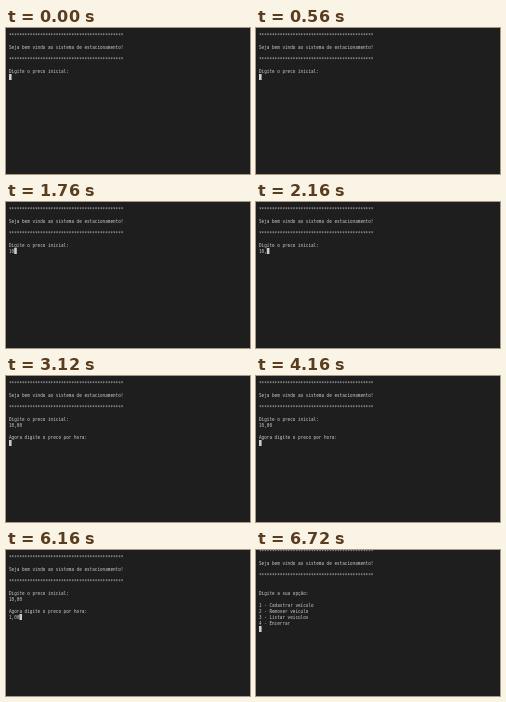
Write an HTML page that moves like this. It is 244 by 146 pixels and loops after 8000 ms.

```html
<!DOCTYPE html>
<html lang="pt">
<meta charset="utf-8">
<title>Estacionamento</title>
<style>
  html, body { margin: 0; width: 100%; height: 100%; overflow: hidden; background: #1e1e1e; }
  /* Laid out at ten times the size so that the tiny text keeps its exact advance. */
  pre {
    position: absolute; left: 3px; top: -2px; margin: 0;
    font: 43.2px/60px "DejaVu Sans Mono", monospace; color: #ccc;
    transform: scale(.1); transform-origin: 0 0;
  }
  i { display: inline-block; width: 26px; height: 60px; vertical-align: top; background: #ccc; }
</style>
<pre id="screen"></pre>
<script>
const LOOP = 8000;
const stars = '*'.repeat(44);
const hello = [stars, '', 'Seja bem vindo ao sistema de estacionamento!', '', stars, ''];
const menu = ['Digite a sua opção:', '', '1 - Cadastrar veículo', '2 - Remover veículo',
  '3 - Listar veículos', '4 - Encerrar', ''];
const startKeys = [1200, 1520, 2160, 2480, 2640];
const hourKeys = [5360, 5600, 5840, 6080];

const typed = (text, keys, t) => text.slice(0, keys.filter(k => t >= k).length);

function lines(t) {
  if (t >= 6720) return [...hello, '', ...menu];
  const out = ['', ...hello, 'Digite o preco inicial:', typed('10,00', startKeys, t)];
  if (t >= 3120) out.push('', 'Agora digite o preco por hora:', typed('1,00', hourKeys, t));
  return out;
}

const screen = document.getElementById('screen');
let shown;
function draw() {
  const html = lines(performance.now() % LOOP).join('\n') + '<i></i>';
  if (html !== shown) screen.innerHTML = shown = html;
  requestAnimationFrame(draw);
}
draw();
</script>
</html>
```
